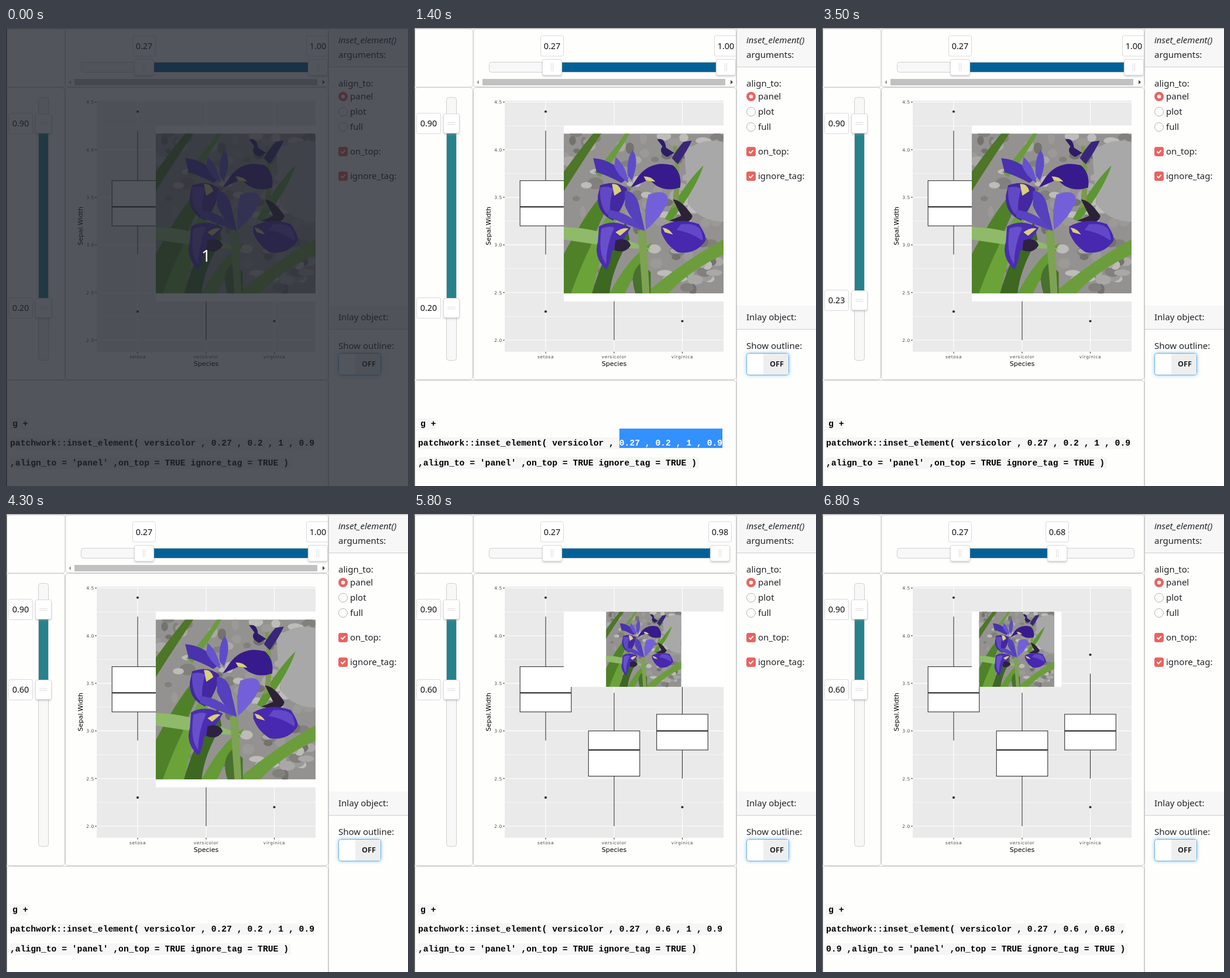
These frames come from a looping animation (687 by 782 pixels, 8000 ms). An HTML page:

```html
<!DOCTYPE html>
<html lang="en">
<head>
<meta charset="utf-8">
<title>Inset element explorer</title>
<style>
  html, body { margin: 0; width: 100%; height: 100%; overflow: hidden; background: #fefefd; }
  svg { display: block; width: 687px; height: 782px; }
  text { font: 15px "Noto Sans", "Open Sans", sans-serif; fill: #212326; white-space: pre; }
  .it { font-style: italic; }
  .num { font-size: 14.4px; font-weight: 500; fill: #111; text-anchor: middle; }
  .off { font-size: 12.6px; font-weight: 600; text-anchor: middle; }
  .code { font: bold 14.69px "Liberation Mono", "DejaVu Sans Mono", monospace; fill: #000; }
  .code.picked { fill: #fff; }
  .tick { font: 7.5px "DejaVu Sans", sans-serif; letter-spacing: .6px; fill: #4d4d4d; }
  .axis { font: 11px "DejaVu Sans", sans-serif; fill: #000; text-anchor: middle; }
  .count { font-size: 28px; fill: #fff; text-anchor: middle; }
  .mid { text-anchor: middle; }
  .end { text-anchor: end; }
  .line { fill: none; stroke: #ccc; }
  .track { fill: #f8f8f8; stroke: #cfcfcf; }
  .knob { fill: #fff; stroke: #d9d9d9; }
  .ink { stroke: #333; fill: #fff; }
</style>
</head>
<body>
<svg id="stage" viewBox="0 0 687 782">
  <defs>
    <clipPath id="topClip"><rect x="102" y="2" width="448" height="98"/></clipPath>
    <filter id="soft" x="-30%" y="-30%" width="160%" height="170%">
      <feDropShadow dx="0" dy="2" stdDeviation="1.6" flood-color="#999" flood-opacity=".45"/>
    </filter>
    <filter id="glow" x="-20%" y="-30%" width="140%" height="160%">
      <feDropShadow dx="0" dy="0" stdDeviation="3" flood-color="#66afe9" flood-opacity=".7"/>
    </filter>
  </defs>
  <g id="page"></g>
  <g id="plot"></g>
  <g id="inset">
    <rect id="insetBg" fill="#fff"/>
    <svg id="photo" viewBox="0 0 272 272"></svg>
  </g>
  <g id="rows"></g>
  <g id="cols" clip-path="url(#topClip)"></g>
  <g id="code"></g>
  <g id="pick">
    <rect id="pickBg" x="351" y="684" height="33" fill="#3390ff"/>
    <text id="pickText" class="code picked" x="350.8" y="713"></text>
  </g>
  <g id="cover">
    <rect width="687" height="782" fill="rgba(34,38,47,.78)"/>
    <text class="count" x="342" y="399">1</text>
  </g>
</svg>
<script>
const $ = id => document.getElementById(id);
const LOOP = 8000, CHAR = 8.815;

const rect = (x, y, w, h, attrs = '') =>
  `<rect x="${x}" y="${y}" width="${w}" height="${h}" ${attrs}/>`;
const text = (x, y, s, cls = '', attrs = '') =>
  `<text x="${x}" y="${y}" class="${cls}" ${attrs}>${s}</text>`;
const path = (d, attrs) => `<path d="${d}" ${attrs}/>`;
const fill = c => `fill="${c}"`;

function buildPage() {
  const radio = (y, label, on) =>
    `<circle cx="576" cy="${y}" r="${on ? 8 : 7.5}" fill="${on ? '#ea6361' : '#fff'}" stroke="${on ? 'none' : '#b5b5b5'}"/>` +
    (on ? `<circle cx="576" cy="${y}" r="3.2" fill="#fff"/>` : '') + text(588, y + 5, label);
  const check = (y, label) =>
    rect(568, y - 8, 16, 16, 'rx="3.5" fill="#ea6361"') +
    path(`M572.5 ${y}l2.6 2.7 4.6-5`, 'fill="none" stroke="#fff" stroke-width="1.9"') +
    text(588, y + 5, label);
  const panel = (x, y, w, h) => rect(x, y, w, h, 'rx="5" class="line"');

  $('page').innerHTML =
    rect(0, 0, 687, 782, fill('#fefefd')) +
    rect(552, 2, 135, 64, fill('#f7f7f7')) +
    rect(552, 474, 135, 40, fill('#f7f7f7')) +
    path('M552 66.5H687M552 514.5H687M551.5 1V782', 'class="line"') +
    panel(1.5, 1.5, 99.5, 99.5) + panel(101.5, 1.5, 449, 99) +
    panel(1.5, 101.5, 99, 499) + panel(101.5, 101.5, 449, 499) +
    panel(1.5, 601.5, 549, 200) +
    rect(0, 0, 687, 1.5, fill('#bdbdbd')) + rect(0, 0, 1.3, 782, fill('#3a3a3a')) +
    text(568, 26, 'inset_element()', 'it') + text(568, 51, 'arguments:') +
    text(568, 100, 'align_to:') +
    radio(117, 'panel', true) + radio(143, 'plot') + radio(169, 'full') +
    check(211, 'on_top:') + check(253, 'ignore_tag:') +
    text(568, 499, 'Inlay object:') + text(568, 548, 'Show outline:') +
    rect(568.5, 555.5, 72, 37, 'rx="4" fill="#fff" stroke="#66afe9" filter="url(#glow)"') +
    path('M597 556H637Q640 556 640 559V589Q640 592 637 592H597Z', fill('#eee')) +
    text(620, 578, 'OFF', 'off');
}

function buildPlot() {
  const yOf = v => 533 - 162.6 * (v - 2);
  const xs = [225, 342, 458.5];
  let s = rect(155, 124, 374, 428.7, fill('#eaeaea'));
  for (let v = 2; v <= 4.5; v += 0.25) {
    const y = yOf(v), major = v % 0.5 === 0;
    s += path(`M155 ${y}H529`, `stroke="#fff" stroke-width="${major ? 1.1 : .55}"`);
    if (major) {
      s += path(`M152 ${y}h3`, 'stroke="#333"') +
        text(151, y + 2.8, v.toFixed(1), 'tick end');
    }
  }
  ['setosa', 'versicolor', 'virginica'].forEach((name, i) => {
    s += path(`M${xs[i]} 124V552.7`, 'stroke="#fff" stroke-width="1.1"') +
      path(`M${xs[i]} 552.7v3`, 'stroke="#333"') + text(xs[i], 564, name, 'tick mid');
  });
  // low, lower quartile, median, upper quartile, high, outliers
  [[2.9, 3.2, 3.4, 3.675, 4.2, 2.3, 4.4],
   [2, 2.525, 2.8, 3, 3.4],
   [2.5, 2.8, 3, 3.175, 3.6, 2.2, 3.8]].forEach((b, i) => {
    const x = xs[i], [lo, q1, m, q3, hi, ...dots] = b.map(yOf);
    s += path(`M${x} ${hi}V${q3}M${x} ${q1}V${lo}`, 'class="ink" stroke-width="1.1"') +
      rect(x - 43.8, q3, 87.6, q1 - q3, 'class="ink" stroke-width="1.1"') +
      path(`M${x - 43.8} ${m}h87.6`, 'class="ink" stroke-width="2.1"');
    for (const y of dots) s += `<circle cx="${x}" cy="${y}" r="2.1" fill="#333"/>`;
  });
  s += text(342, 577, 'Species', 'axis') +
    text(0, 0, 'Sepal.Width', 'axis', 'transform="translate(131 338) rotate(-90)"');
  $('plot').innerHTML = s;
}

function buildPhoto() {
  let seed = 7;
  const rnd = () => (seed = (seed * 16807) % 2147483647) / 2147483647;
  let s = rect(0, 0, 272, 272, fill('#949290'));
  const greys = ['#aaa8a6', '#82807c', '#bebcb9', '#74726d', '#9c9a96'];
  for (let i = 0; i < 130; i++) {
    s += `<ellipse cx="${rnd() * 272}" cy="${rnd() * 272}" rx="${5 + rnd() * 9}" ry="${4 + rnd() * 6}" fill="${greys[i % 5]}"/>`;
  }
  const shapes = [
    ['#a9a8a9', 'M205 30Q240 5 272 15V150Q235 150 212 120Z'],
    ['#4d7628', 'M0 65Q25 30 50 0H64Q30 50 0 98Z'],
    ['#6a9c3e', 'M52 66Q84 30 104 0H112Q92 36 62 74Z'],
    ['#4f8228', 'M0 205Q45 120 82 85L88 102Q50 160 22 272H0Z'],
    ['#6ba338', 'M12 272Q45 180 90 115L98 130Q65 190 48 272Z'],
    ['#3c6822', 'M48 272Q70 195 106 150L112 180Q82 230 78 272Z'],
    ['#649b35', 'M78 272Q110 210 150 185L140 205Q120 240 104 272Z'],
    ['#8fba69', 'M0 159Q55 160 120 186L150 197Q90 195 0 180Z'],
    ['#5d9632', 'M172 145Q208 82 238 54Q226 92 182 150Z'],
    ['#6c9d3c', 'M148 264Q215 210 272 180V206Q215 232 178 272H146Z'],
    ['#47712c', 'M122 272Q110 235 132 220L148 236V272Z'],
    ['#7da252', 'M126 165H140L146 272H134Z'],
    ['#7c9950', 'M186 22L192 20Q200 60 195 122L184 128Q192 70 186 22Z'],
    ['#2e1b68', 'M159 10Q172 6 174 24L188 33L176 40Q160 32 168 22Z'],
    ['#392679', 'M184 42Q190 30 204 14L218 12Q210 30 194 52Z'],
    ['#2d2138', 'M186 112Q200 112 219 140Q216 158 180 148L200 140Z'],
    // upper bloom
    ['#4a32ae', 'M50 42Q84 44 110 76L98 84Q72 70 56 66Z'],
    ['#5d4cc8', 'M109 72Q106 44 117 28Q130 44 116 80Z'],
    ['#6753ce', 'M88 40Q106 54 110 84Q96 76 86 56Z'],
    ['#371b8c', 'M126 74Q148 44 186 54Q202 68 198 92Q166 102 146 78L114 92Z'],
    ['#4328a1', 'M62 88Q90 78 108 94Q106 120 84 148Q56 136 58 106Z'],
    ['#6149c6', 'M62 92Q76 88 84 94Q76 122 80 142Q60 130 62 92Z'],
    // lower bloom
    ['#5540bd', 'M104 98Q124 96 130 130L138 165Q112 145 104 122Z'],
    ['#7360d8', 'M144 104Q176 92 178 114Q166 142 140 164Q136 130 144 104Z'],
    ['#5a43c2', 'M74 130Q112 132 138 166Q104 154 76 142Z'],
    ['#4a2db0', 'M60 158Q84 144 114 160Q102 184 82 200Q78 226 72 231Q50 210 58 184Z'],
    ['#6850cb', 'M64 162Q78 156 86 160Q72 190 72 222Q58 204 64 162Z'],
    ['#4728ae', 'M166 158Q196 142 230 154Q246 178 240 184Q224 206 194 202Q174 190 166 168Z'],
    ['#6248c8', 'M200 154Q222 152 232 162Q238 176 236 182Q216 168 192 164Z'],
    ['#2d2140', 'M88 182Q108 174 114 190Q104 206 86 198Z'],
    ['#d9cf78', 'M82 86Q94 84 98 98L86 106Z'],
    ['#d9cf78', 'M136 73Q148 72 156 82L140 80Z'],
    ['#d9cf78', 'M88 168Q102 158 110 162L96 174Z'],
    ['#d9cf78', 'M168 160Q180 162 186 172L172 168Z']
  ];
  for (const [c, d] of shapes) s += path(d, fill(c));
  $('photo').innerHTML = s;
}

const knob = (x, y, w, h) => rect(x - w / 2 + .5, y - h / 2 + .5, w - 1, h - 1,
  'rx="3" class="knob" filter="url(#soft)"');
const tip = (x, y, w, h, v) => rect(x - w / 2 + .5, y - h / 2 + .5, w - 1, h - 1,
  'rx="3" class="knob"') + text(x, y + 5.2, v.toFixed(2), 'num');

function drawRows(low) {
  const yOf = v => Math.round(568 - 450 * v);
  let s = rect(55.5, 118.5, 17, 449, 'rx="4" class="track"') +
    rect(56, yOf(.9), 16, yOf(low) - yOf(.9), fill('#26828c'));
  for (const v of [.9, low]) {
    const y = yOf(v);
    s += knob(64, y, 28, 34) +
      path(`M57 ${y - 1.5}h14M57 ${y + 1.5}h14`, 'stroke="#dedddc"') + tip(25, y, 42, 36, v);
  }
  $('rows').innerHTML = s;
}

function drawCols(right) {
  const xOf = v => Math.round(126.2 + 406.6 * v);
  let s = rect(128.5, 58.5, 405, 17, 'rx="4" class="track"') +
    rect(xOf(.27), 59, xOf(right) - xOf(.27), 16, fill('#006098'));
  for (const v of [.27, right]) {
    const x = xOf(v);
    s += knob(x, 67, 34, 28) +
      path(`M${x - 1.5} 60v14M${x + 1.5} 60v14`, 'stroke="#dedddc"') + tip(x, 30.5, 40, 36, v);
  }
  if (right > .99) {
    s += rect(117, 87, 415, 11, fill('#c1c1c1')) +
      path('M111 89v7l-4-3.5z', fill('#a3a3a3')) + path('M541 89v7l4-3.5z', fill('#444'));
  }
  $('cols').innerHTML = s;
}

function drawCode(low, right) {
  const call = 'patchwork::inset_element( versicolor , 0.27 , ';
  const opts = ",align_to = 'panel' ,on_top = TRUE ignore_tag = TRUE )";
  const lines = right === 1
    ? ['g +', `${call}${low} , 1 , 0.9`, opts]
    : ['g +', `${call}${low} , ${right} ,`, `0.9 ${opts}`];
  $('code').innerHTML = lines.map((line, i) => {
    const y = [680, 713, 747][i], w = line.length * CHAR + (i === 1 ? 0 : 4);
    return rect(7, y - 14, w, 20, 'rx="2" fill="#f6f6f6"') + text(i ? 7 : 11, y, line, 'code');
  }).join('');
}

function drawInset(low, right) {
  const x = 155 + 374 * .27, y = 552.5 - 428.7 * .9;
  const w = 374 * (right - .27), h = 428.7 * (.9 - low), side = Math.min(w, h);
  const set = (el, box) => Object.entries(box).forEach(([k, v]) => el.setAttribute(k, v));
  set($('insetBg'), { x, y, width: w, height: h });
  set($('photo'), { x: x + (w - side) / 2, y: y + (h - side) / 2, width: side, height: side });
}

// Six eased moves, one every 100 ms
function glide(t, start, from, to) {
  const k = Math.max(0, Math.min(6, Math.floor((t - start) / 100) + 1)) / 6;
  return from + (to - from) * k * k * (3 - 2 * k);
}

const within = (t, a, b) => t >= a && t < b;
const show = (id, on) => $(id).style.display = on ? '' : 'none';

let last = -1;
function draw(t) {
  const step = Math.floor(t / 100);
  if (step === last) return;
  last = step;
  const low = t < 4500 ? .2 : .6, right = t < 6800 ? 1 : .68;
  drawRows(glide(t, 3500, .2, .5956));
  drawCols(glide(t, 5800, 1, .678));
  drawInset(low, right);
  drawCode(low, right);
  const n = Math.round(glide(t, 900, 0, 20));
  $('pickBg').setAttribute('width', n === 20 ? 176 : n * CHAR);
  $('pickText').textContent = '0.27 , 0.2 , 1 , 0.9'.slice(0, n);
  show('pick', within(t, 900, 2600));
  show('cover', t < 100);
}

buildPage();
buildPlot();
buildPhoto();
const start = performance.now();
function tick() {
  draw((performance.now() - start) % LOOP);
  requestAnimationFrame(tick);
}
tick();
</script>
</body>
</html>
```
